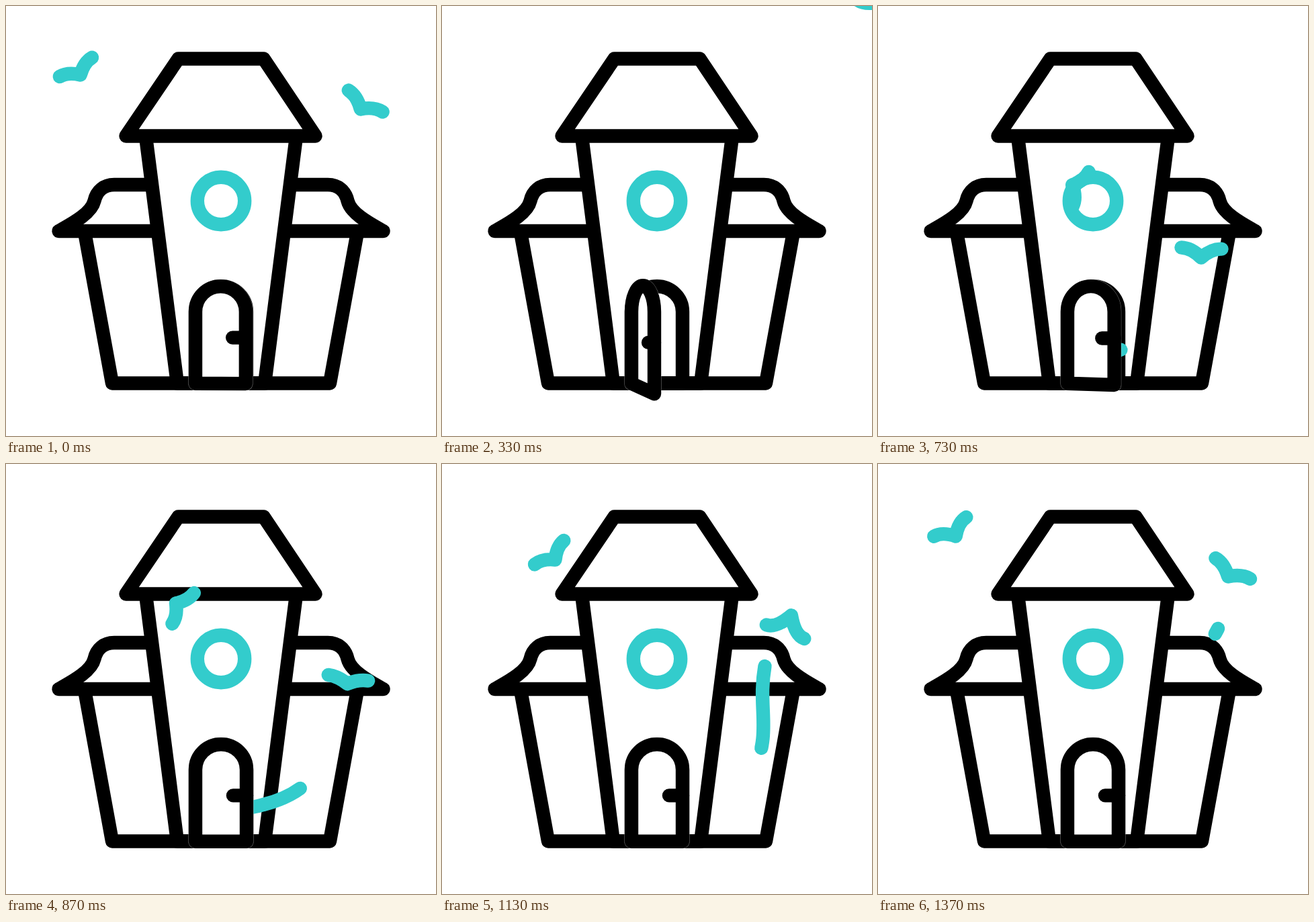
Recreate the animation shown at these times as an HTML page. Size 640x640 px, loop 1400 ms.

```html
<!DOCTYPE html>
<html lang="en">
<head>
<meta charset="utf-8">
<title>Haunted house</title>
<style>
  html, body { margin: 0; width: 100%; height: 100%; overflow: hidden; background: #fff; }
  svg { display: block; width: 100vw; height: 100vh; }
  .ink, .teal { fill: none; stroke-width: 20.4; stroke-linejoin: round; }
  .ink { stroke: #000; }
  .teal { stroke: #3cc; stroke-linecap: round; }
</style>
</head>
<body>
<svg viewBox="0 0 640 640">
  <defs>
    <g id="side">
      <path d="M213 266H161C146 266 135 275 131.5 290C127 309 98 324 78.5 335H222"/>
      <path d="M116.7 335L158 561.5H320"/>
      <path d="M207.9 193.5L254.9 561.5H320"/>
    </g>
  </defs>
  <g class="ink">
    <use href="#side"/>
    <use href="#side" transform="matrix(-1 0 0 1 640 0)"/>
    <path d="M256.5 78.5H383.5L460.5 193.5H178.5Z"/>
    <path id="frame"/>
  </g>
  <circle class="teal" cx="320" cy="290" r="35.2"/>
  <path id="trail" class="teal" d="M340 514C352 513 370 511 383 507C438 493 470 465 477 413C482 378 472 345 481 298C485 282 496 264 506 245"/>
  <path id="left" class="teal"/>
  <path id="right" class="teal"/>
  <path id="edge" fill="#fff" stroke="#fff" stroke-width="21.3" stroke-linejoin="round" stroke-opacity=".5"/>
  <path id="leaf" class="ink"/>
  <path id="knob" class="ink" stroke-linecap="round"/>
</svg>
<script>
const LOOP = 1400, BIRTH = 450;
const el = id => document.getElementById(id);
const set = (id, name, value) => el(id).setAttribute(name, value);
const trailLength = el('trail').getTotalLength();

const smooth = u => u * u * (3 - 2 * u);
const ease = (t, from, to) => smooth(Math.min(1, Math.max(0, (t - from) / (to - from))));

// route: [time, x, y] points; beats: times of wing strokes, starting with body high
const birds = {
  left: {
    route: [[530, 299, 480], [730, 302, 273], [970, 226, 189], [1130, 160, 132],
      [1400, 104, 91], [1570, 97, 84], [1800, -48, -50]],
    beats: [770, 1290, 1640], high: -14, low: 18, half: 28,
    tilt: t => -30.5 - 34.5 * Math.max(0, (1400 - t) / 670) ** 1.5
  },
  right: {
    route: [[450, 270, 485], [530, 330, 479], [730, 481, 361], [970, 511, 295],
      [1130, 511, 250], [1370, 528, 156], [1400, 535, 142], [1570, 541, 107], [1800, 685, -35]],
    beats: [400, 740, 1170, 1390, 1580], high: -26, low: 14, half: 30,
    tilt: t => 2 + 0.045 * (t - 730) + 99 * (1 - ease(t, 520, 730))
  }
};

// Smooth curve through the route at time t
function follow(route, t) {
  const last = route.length - 1;
  if (t <= route[0][0]) return route[0].slice(1);
  if (t >= route[last][0]) return route[last].slice(1);
  const i = route.findIndex(p => p[0] > t) - 1;
  const gap = k => route[k + 1][0] - route[k][0];
  const rate = (k, c) => (route[k + 1][c] - route[k][c]) / gap(k);
  const slope = (k, c) => {
    if (k === 0) return rate(0, c);
    if (k === last) return rate(last - 1, c);
    const a = gap(k - 1), b = gap(k);
    return (rate(k - 1, c) * b + rate(k, c) * a) / (a + b);
  };
  const h = gap(i), u = (t - route[i][0]) / h, v = 1 - u;
  return [1, 2].map(c => route[i][c] * smooth(v) + route[i + 1][c] * smooth(u)
    + h * u * v * (slope(i, c) * v - slope(i + 1, c) * u));
}

// Swings between 0 and 1, turning at each beat
const swingAt = (t, beats) => beats.slice(1).reduce((sum, b, i) =>
  sum + (i % 2 ? -1 : 1) * smooth(ease(t, beats[i], b)), 0);

function drawBird(id, t) {
  const { route, beats, high, low, half, tilt } = birds[id];
  const [x, y] = follow(route, t);
  const body = high + (low - high) * swingAt(t, beats);
  set(id, 'd', `M${-half} 0Q${-half / 2} 0 0 ${body}Q${half / 2} 0 ${half} 0`);
  set(id, 'transform', `translate(${x} ${y}) rotate(${tilt(t)})`);
}

function drawTrail(t) {
  const head = trailLength * ease(t, 630, 1310);
  const tail = trailLength * ease(t, 845, 1425);
  set('trail', 'visibility', t > 690 && t < 1390 ? 'visible' : 'hidden');
  set('trail', 'stroke-dasharray', `${head - tail} 2000`);
  set('trail', 'stroke-dashoffset', -tail);
}

// Arched door, its free edge pulled in by "open" pixels
function doorPath(open) {
  const l = 282, r = 358 - open, m = (l + r) / 2, top = 417.3 - open / 42;
  const k = (r - l) / 2 * 0.552, spring = 455, up = spring - 21;
  return `M${l} 561.7V${spring}C${l} ${up} ${m - k} ${top} ${m} ${top}` +
    `C${m + k} ${top} ${r} ${up} ${r} ${spring}V${561.7 + open * 0.37}Z`;
}

function drawDoor(t) {
  const open = 42 * (ease(t, -35, 330) - ease(t, 550, 790));
  const door = doorPath(open);
  set('edge', 'd', door);
  set('leaf', 'd', door);
  set('knob', 'd', `M${282 + 56 * (1 - open / 76)} ${493.4 + open * 0.178}H${358 - open}`);
}

function draw(t) {
  const flight = t < BIRTH ? t + LOOP : t;
  drawBird('left', flight);
  drawBird('right', flight);
  drawTrail(t);
  drawDoor(t < 1200 ? t : t - LOOP);
}

set('frame', 'd', doorPath(0));
const start = performance.now();
function tick() {
  draw((performance.now() - start) % LOOP);
  requestAnimationFrame(tick);
}
tick();
</script>
</body>
</html>
```
